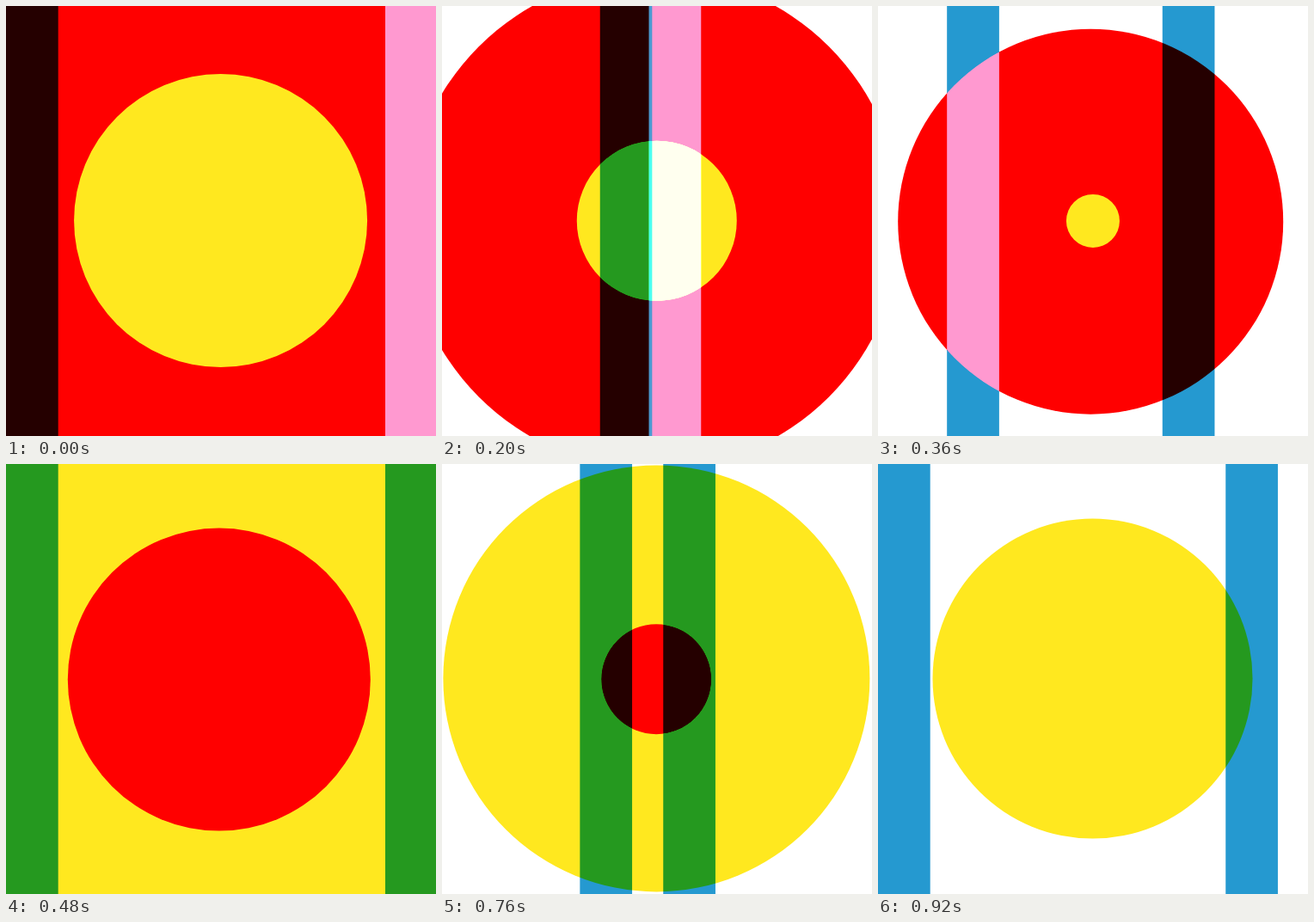
An HTML page with a canvas that plays this animation: 500 by 500 pixels, repeating every 960 ms.

```html
<!DOCTYPE html>
<html lang="en">
<head>
<meta charset="utf-8">
<title>Shrinking discs and crossing bars</title>
<style>
  html, body { margin: 0; width: 100%; height: 100%; overflow: hidden; background: #fff; }
  canvas { display: block; width: 500px; height: 500px; }
</style>
</head>
<body>
<canvas id="stage" width="500" height="500"></canvas>
<script>
const ctx = document.getElementById('stage').getContext('2d');
const SIZE = 500;
const STEP_MS = 40;
const STEPS = 24;
const HALF = STEPS / 2;
const LAST = STEPS - 1;

const BLUE = '#2599d0';
const BAR_WIDTH = 60.7;
const BAR_TRAVEL = 441;

// Each disc shrinks to nothing over one loop, drifting slightly to the centre.
const red = { color: '#ff0000', start: 0, shrink: 16, driftX: -0.0125, driftY: 0.003 };
const yellow = { color: '#ffe81f', start: HALF, shrink: 15.5, driftX: -0.0025, driftY: -0.0025 };

function drawDisc(disc, step) {
  const age = (step - disc.start + STEPS) % STEPS;
  const r = disc.shrink * (LAST - age);
  if (r <= 0) return;
  ctx.fillStyle = disc.color;
  ctx.beginPath();
  ctx.arc(SIZE / 2 + disc.driftX * r, SIZE / 2 + disc.driftY * r, r, 0, Math.PI * 2);
  ctx.fill();
}

function drawBar(x, blend) {
  ctx.globalCompositeOperation = blend;
  ctx.fillStyle = BLUE;
  ctx.fillRect(x, 0, BAR_WIDTH, SIZE);
}

function draw(step) {
  const firstHalf = step < HALF;
  const phase = step % HALF;

  ctx.globalCompositeOperation = 'source-over';
  ctx.clearRect(0, 0, SIZE, SIZE);

  // The newer disc is the larger one and lies underneath.
  const discs = firstHalf ? [red, yellow] : [yellow, red];
  discs.forEach(disc => drawDisc(disc, step));

  // The canvas is transparent outside the discs, so the bars stay blue there.
  drawBar(BAR_TRAVEL * phase / HALF, 'darken');
  drawBar(BAR_TRAVEL * (1 - phase / (HALF - 1)), firstHalf ? 'lighter' : 'darken');
}

const startTime = performance.now();

function tick() {
  const elapsed = performance.now() - startTime;
  draw(Math.floor(elapsed / STEP_MS) % STEPS);
  requestAnimationFrame(tick);
}

tick();
</script>
</body>
</html>
```
